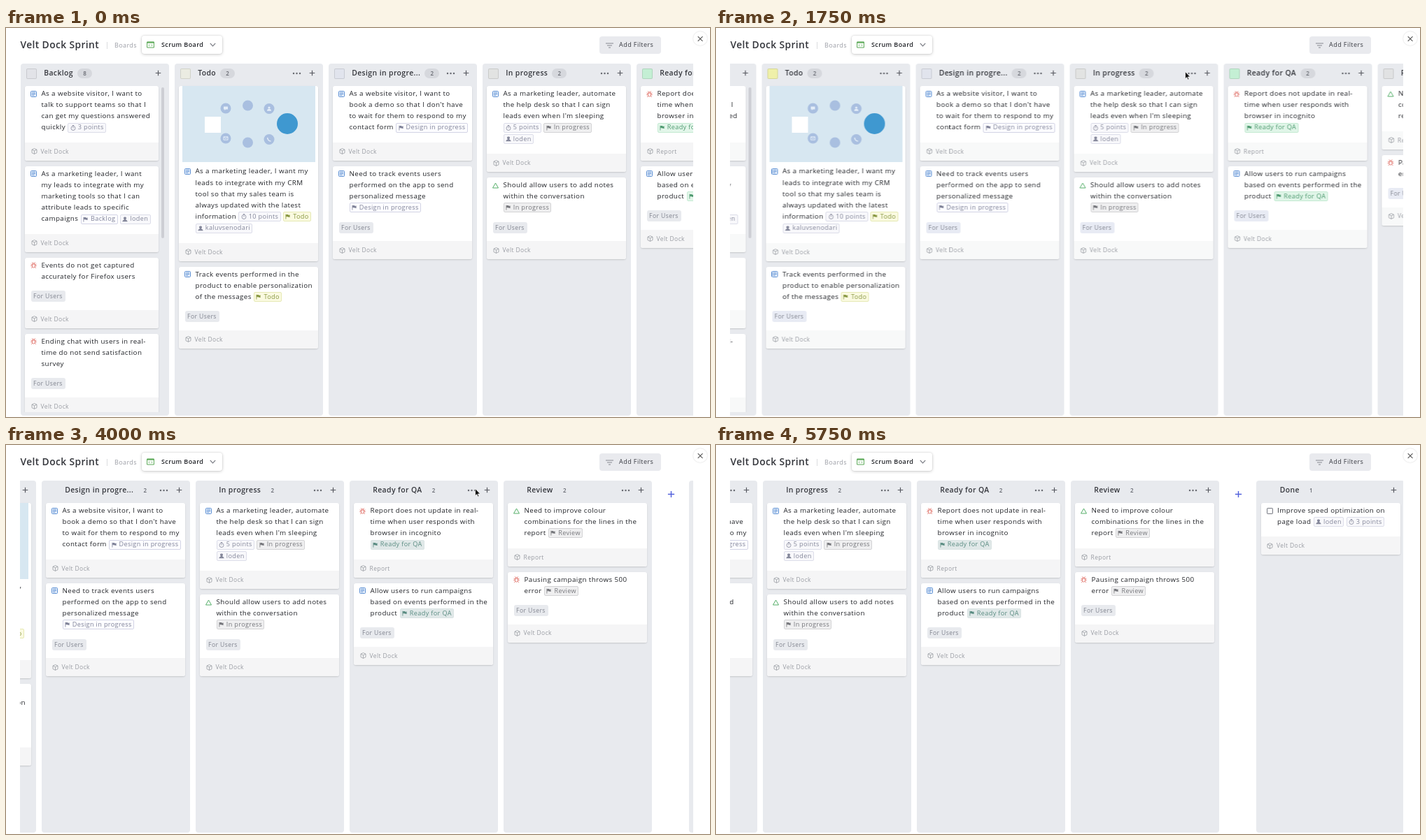
Animation of 1006 by 557 pixels, one loop 6.5 s. Source, as an HTML page:

```html
<!DOCTYPE html>
<html lang="en">
<head>
<meta charset="utf-8">
<title>Sprint board</title>
<style>
html, body { margin: 0; width: 100%; height: 100%; overflow: hidden; background: #fff; }
body { position: relative; font: 9.8px/16.2px "Open Sans", "Noto Sans", sans-serif; letter-spacing: .4px; color: #222429; white-space: nowrap; }
svg { display: block; flex: none; fill: none; stroke: currentColor; overflow: visible; }
.abs, .col, .swatch, .menu, .add, .thumb { position: absolute; }
.row { display: flex; align-items: center; }

/* top bar */
.title { left: 20.5px; top: 14px; font-size: 13.8px; line-height: 20px; font-weight: 600; color: #33353b; }
.rule { left: 144px; top: 20px; width: 1px; height: 10px; background: #dcdde0; }
.crumb { left: 155px; top: 17px; font-size: 9px; color: #9b9da5; }
.picker { left: 194px; top: 11px; width: 115px; height: 26px; border-radius: 4px; box-shadow: 0 0 1px 1px #0000000d, 0 1px 4px #00000030; }
.picker b { position: absolute; left: 28px; font-size: 9px; font-weight: 600; }
.filters { left: 848px; top: 12px; width: 88px; height: 25px; border-radius: 4px; background: #e9eaee; }
.filters span { position: absolute; left: 28px; font-size: 9.1px; color: #3c3e45; }
.close { left: 982px; top: 5px; width: 20px; height: 20px; border-radius: 50%; box-shadow: 0 0 2px #00000033; color: #555; }

/* board */
.view { left: 20px; top: 51px; width: 962px; height: 504px; overflow: hidden; }
.board { left: -20px; top: -51px; width: 1700px; height: 557px; animation: scroll 6.5s step-end infinite, tone 6.5s step-end infinite; }
.col { top: 51px; width: 212px; height: 504px; border-radius: 4px; background: #e8eaee; }
.head { position: absolute; left: 33.7px; top: 4.5px; height: 18px; font-size: 10.4px; font-weight: 600; color: #34363c; }
.badge { margin-left: 6px; width: 21px; height: 14px; border-radius: 7px; background: var(--badge); font: 600 8px/14px "Open Sans", sans-serif; letter-spacing: 0; text-align: center; color: #666971; }
.swatch { left: 8px; top: 6.5px; width: 15px; height: 15px; box-sizing: border-box; border: 1px solid #0000001c; border-radius: 2px; opacity: var(--swatch); }
.menu { left: 168.5px; top: 11.5px; color: #6a6c73; }
.add { left: 192px; top: 9px; color: #55575e; }
.thumb { left: 201px; top: 34px; width: 4.5px; height: 216px; border-radius: 3px; background: #cdced4; }
.cards { position: absolute; left: 0; top: 30px; width: 212px; height: 467px; padding-top: 2px; overflow: hidden; }
.card { margin: 0 6.5px 8px; border-radius: 3px; background: #fff; box-shadow: 0 1px 2px #00000026; overflow: hidden; }
.narrow .card { margin-right: 15px; }
.body { position: relative; padding: 2.9px 0 13.2px 23.5px; }
.labelled { padding-bottom: 11.5px; }
.body > svg { position: absolute; left: 8px; top: 6.5px; }
.line { display: flex; align-items: center; gap: 3.4px; height: 16.2px; }
.tag { display: flex; align-items: center; gap: 3px; height: 14px; box-sizing: border-box; padding: 0 2.3px; border: 1px solid; border-radius: 2px; font-size: 9.1px; letter-spacing: .36px; }
.label { width: 49px; height: 16px; margin: 12.2px 0 0 -15px; border-radius: 3px; background: var(--label); color: #80848f; font-size: 8.6px; line-height: 16px; text-align: center; }
.foot { display: flex; align-items: center; gap: 5px; height: 26px; padding-left: 8.5px; background: var(--foot); color: #999ca3; font-size: 8.5px; }
.pic { display: block; margin: 0 4.5px 2.6px; background: #d7e7f1; }
.plus { left: 1354.5px; top: 65px; color: #5260dc; }

.lilac { color: #7f8298; border-color: #d3d4e5; background: #fcfcff; }
.mist  { color: #84879a; border-color: #dcdde9; background: #f8f8fb; }
.grey  { color: #76777c; border-color: #d3d3d5; background: #efeff0; }
.lime  { color: #87963f; border-color: #e6e9b4; background: #fafae1; }
.green { color: var(--qa); border-color: var(--qa-edge); background: var(--qa-bg); }

.cursor { left: 670px; top: 61.5px; animation: pointer 6.5s step-end infinite; }

@keyframes scroll {
  0% { transform: none; }
  3.846% { transform: translateX(-8px); }
  7.692% { transform: translateX(-32px); }
  11.538% { transform: translateX(-65.5px); }
  15.384% { transform: translateX(-98px); }
  19.23% { transform: translateX(-128px); }
  23.076% { transform: translateX(-154px); }
  26.923% { transform: translateX(-175.5px); }
  34.615% { transform: translateX(-212px); }
  38.461% { transform: translateX(-248px); }
  42.307% { transform: translateX(-284.5px); }
  46.153% { transform: translateX(-322px); }
  50% { transform: translateX(-361px); }
  53.846% { transform: translateX(-394px); }
  61.538% { transform: translateX(-410px); }
  65.384% { transform: translateX(-447px); }
  69.23% { transform: translateX(-485px); }
  73.076% { transform: translateX(-522.5px); }
  76.923% { transform: translateX(-553px); }
  80.769% { transform: translateX(-579px); }
  84.615% { transform: translateX(-600px); }
  88.461%, 100% { transform: translateX(-614px); }
}
@keyframes tone {
  0% { --swatch: 1; --badge: #d6d8dd; --label: #e8eaee; --foot: #f5f5f6; --todo: #ebece2; --qa: #4f9a70; --qa-edge: #c4ead2; --qa-bg: #e3f6ea; }
  3.846% { --swatch: 1; --badge: #d6d8dd; --label: #e8ebf4; --foot: #f8f9f9; --todo: #eff0a9; --qa: #4f9a70; --qa-edge: #c4ead2; --qa-bg: #e0f5e8; }
  61.538%, 100% { --swatch: 0; --badge: #e8eaee; --label: #e8eaee; --foot: #f5f5f6; --todo: #eff0a9; --qa: #5a8c82; --qa-edge: #dbe4e4; --qa-bg: #e0e8e8; }
}
@keyframes pointer {
  0% { opacity: 0; }
  3.846% { opacity: 1; }
  88.461%, 100% { opacity: 0; }
}
</style>
</head>
<body>
<svg width="0" height="0" style="position:absolute">
  <symbol id="story" viewBox="0 0 9 9"><rect x=".5" y=".5" width="8" height="8" rx="1" fill="#e9f1fc"/><path d="M2 2.7h5M2 4.5h5M2 6.3h3.4" stroke-width=".9"/></symbol>
  <symbol id="bug" viewBox="0 0 9 9"><path d="M2.6 3.2h3.8v2.7a1.9 2.2 0 0 1-3.8 0zM3 3.2a1.5 1.6 0 0 1 3 0M2.6 4.2.5 3M6.4 4.2 8.5 3M2.6 5.6H.2M6.4 5.6h2.4M3 7.2 1.1 8.8M6 7.2l1.9 1.6M3.3 1.9 2.3.4M5.700 1.9l1-1.5" stroke-width=".75"/></symbol>
  <symbol id="idea" viewBox="0 0 9 9"><path d="M4.5 1 8.5 8h-8z"/></symbol>
  <symbol id="task" viewBox="0 0 9 9"><rect x=".6" y=".6" width="7.8" height="7.8" rx=".5"/></symbol>
  <symbol id="flag" viewBox="0 0 8 8"><path d="M.9.8v6.8" stroke-width=".8"/><path d="M1.2 1h2.7l.5.7h2.7l-.8 1.5.8 1.6H4.300l-.4-.6H1.2z" fill="currentColor" stroke="none"/></symbol>
  <symbol id="clock" viewBox="0 0 8 8"><circle cx="4" cy="4.5" r="3" stroke-width=".8"/><path d="M4 4.5V2.8M2.8.5h2.4" stroke-width=".8"/></symbol>
  <symbol id="person" viewBox="0 0 8 8"><path d="M4 .4a1.9 1.9 0 0 1 1 3.6c0 .8 2.6.9 2.6 3.3H.4C.4 4.9 3 4.8 3 4A1.9 1.9 0 0 1 4 .4z" fill="currentColor" stroke="none"/></symbol>
  <symbol id="cube" viewBox="0 0 9 9"><path d="M4.5.6 8 2.2v4.5L4.5 8.4 1 6.7V2.2zM1 2.2l3.5 1.7L8 2.2M4.5 3.9v4.5" stroke-width=".8"/></symbol>
  <symbol id="cross" viewBox="0 0 10 10"><path d="M5 .8v8.4M.8 5h8.4" stroke-width="1.3"/></symbol>
</svg>

<div class="abs title">Velt Dock Sprint</div>
<div class="abs rule"></div>
<div class="abs crumb">Boards</div>
<div class="abs picker row">
  <svg class="abs" style="left:7px;color:#5aa856" width="11" height="10"><path d="M.6 1h9.8v8H.6z"/><path d="M.6 1.7h9.8" stroke-width="1.8"/><path d="M4.4 4.3 3 5.7l1.4 1.4M6.6 4.3 8 5.7 6.6 7.1" stroke-width=".8"/></svg>
  <b>Scrum Board</b>
  <svg class="abs" style="left:96.5px;color:#777a82" width="9" height="6"><path d="m.8.8 3.7 4L8.2.8" stroke-width="1.2"/></svg>
</div>
<div class="abs filters row">
  <svg class="abs" style="left:9px;color:#85878f" width="11" height="8"><path d="M0 1h11M2 4h7M4 7h3"/></svg>
  <span>Add Filters</span>
</div>
<div class="abs close"><svg width="20" height="20"><path d="m6.7 7.1 6.8 6.8M13.5 7.1l-6.8 6.8" stroke-width="1.1"/></svg></div>

<div class="abs view"><div class="abs board" id="board"></div></div>
<svg class="abs cursor" width="9" height="13"><path d="M.5.5v10.3l2.3-2.2 1.5 3.5 1.6-.7-1.5-3.4h3.2z" fill="#111" stroke="#fff" stroke-width=".7"/></svg>

<script>
const icon = (id, size, color = '') =>
  `<svg width="${size}" height="${size}" style="color:${color}"><use href="#${id}"/></svg>`;

const markColor = { story: '#5a8ed2', bug: '#dc6258', idea: '#54ae68', task: '#70737d' };

// tag kind: [style, icon, fixed text]
const kinds = {
  pts: ['mist', 'clock'], user: ['mist', 'person'],
  log: ['lilac', 'flag', 'Backlog'], design: ['lilac', 'flag', 'Design in progress'],
  todo: ['lime', 'flag', 'Todo'], prog: ['grey', 'flag', 'In progress'],
  qa: ['green', 'flag', 'Ready for QA'], review: ['grey', 'flag', 'Review']
};

function tag(spec) {
  const [kind, text] = spec.split(':');
  const [style, glyph, fixed] = kinds[kind];
  return `<span class="tag ${style}">${icon(glyph, 8)}${text || fixed}</span>`;
}

function line(src) {
  const [text, ...tags] = src.split('|');
  return `<div class="line">${text && `<span>${text}</span>`}${tags.map(tag).join('')}</div>`;
}

const dot = (x, y, glyph = '') =>
  `<g transform="translate(${x} ${y})"><circle r="7.5" fill="#a9bfe0" stroke="none"/><g stroke="#e4eef8" fill="#e4eef8">${glyph}</g></g>`;

const picture = `<svg class="pic" width="190" height="109">
  ${dot(62, 32, '<path d="M-3-2.5h6v4H0l-1.5 1.5V1.5H-3z" stroke="none"/>')}
  ${dot(93.5, 28)}
  ${dot(124, 32.5, '<circle cy="-1.5" r="1.6" stroke="none"/><path d="M-3 3.2a3 3 0 0 1 6 0z" stroke="none"/>')}
  ${dot(62, 75, '<path d="M-3-2.2h6v4.4h-6zM-3-2.2 0 .4l3-2.6" fill="none"/>')}
  ${dot(93.5, 81)}
  ${dot(124, 76.5, '<path d="M-2.3-2.6c0 2.8 2 4.9 4.8 5" fill="none" stroke-width="1.5"/>')}
  <rect x="32" y="44" width="23" height="23" fill="#fff" stroke="none"/>
  <circle cx="150" cy="54" r="15" fill="#3f98d0" stroke="none"/>
</svg>`;

const dots = `<svg class="menu" width="13" height="4"><g fill="currentColor" stroke="none">
  ${[2, 6.5, 11].map(x => `<circle cx="${x}" cy="2" r="1.25"/>`).join('')}</g></svg>`;

function card({ mark, text, users, foot = 'Velt Dock', pic }) {
  return `<div class="card">${pic ? picture : ''}
    <div class="body ${users ? 'labelled' : ''}">${icon(mark, 9, markColor[mark])}${text.map(line).join('')}
    ${users ? '<div class="label">For Users</div>' : ''}</div>
    <div class="foot">${icon('cube', 9)}${foot}</div></div>`;
}

function column({ x, name, count, color, cards, narrow, menu = true }) {
  return `<div class="col ${narrow ? 'narrow' : ''}" style="left:${x}px">
    ${color ? `<div class="swatch" style="background:${color}"></div>` : ''}
    <div class="head row">${name}<span class="badge">${count}</span></div>
    ${menu ? dots : ''}
    <div class="add">${icon('cross', 9)}</div>
    <div class="cards">${cards.map(card).join('')}</div>
    ${narrow ? '<div class="thumb"></div>' : ''}</div>`;
}

const columns = [
  { x: 20.5, name: 'Backlog', count: 8, color: '#e2e3e8', narrow: true, menu: false, cards: [
    { mark: 'story', text: ['As a website visitor, I want to', 'talk to support teams so that I', 'can get my questions answered', 'quickly|pts:3 points'] },
    { mark: 'story', text: ['As a marketing leader, I want', 'my leads to integrate with my', 'marketing tools so that I can', 'attribute leads to specific', 'campaigns|log|user:loden'] },
    { mark: 'bug', users: true, text: ['Events do not get captured', 'accurately for Firefox users'] },
    { mark: 'bug', users: true, text: ['Ending chat with users in real-', 'time do not send satisfaction', 'survey'] }
  ] },
  { x: 240.5, name: 'Todo', count: 2, color: 'var(--todo)', cards: [
    { mark: 'story', pic: true, text: ['As a marketing leader, I want my', 'leads to integrate with my CRM', 'tool so that my sales team is', 'always updated with the latest', 'information|pts:10 points|todo', '|user:kaluvsenodari'] },
    { mark: 'story', users: true, text: ['Track events performed in the', 'product to enable personalization', 'of the messages|todo'] }
  ] },
  { x: 460.5, name: 'Design in progre...', count: 2, color: '#e1e4ed', cards: [
    { mark: 'story', text: ['As a website visitor, I want to', "book a demo so that I don't have", 'to wait for them to respond to my', 'contact form|design'] },
    { mark: 'story', users: true, text: ['Need to track events users', 'performed on the app to send', 'personalized message', '|design'] }
  ] },
  { x: 680.5, name: 'In progress', count: 2, color: '#e2e3e2', cards: [
    { mark: 'story', text: ['As a marketing leader, automate', 'the help desk so that I can sign', "leads even when I'm sleeping", '|pts:5 points|prog', '|user:loden'] },
    { mark: 'idea', users: true, text: ['Should allow users to add notes', 'within the conversation', '|prog'] }
  ] },
  { x: 900.5, name: 'Ready for QA', count: 2, color: '#c4efd4', cards: [
    { mark: 'bug', foot: 'Report', text: ['Report does not update in real-', 'time when user responds with', 'browser in incognito', '|qa'] },
    { mark: 'story', users: true, text: ['Allow users to run campaigns', 'based on events performed in the', 'product|qa'] }
  ] },
  { x: 1120.5, name: 'Review', count: 2, color: '#e1e2e3', cards: [
    { mark: 'idea', foot: 'Report', text: ['Need to improve colour', 'combinations for the lines in the', 'report|review'] },
    { mark: 'bug', users: true, text: ['Pausing campaign throws 500', 'error|review'] }
  ] },
  { x: 1386, name: 'Done', count: 1, menu: false, cards: [
    { mark: 'task', text: ['Improve speed optimization on', 'page load|user:loden|pts:3 points'] }
  ] }
];

document.getElementById('board').innerHTML =
  columns.map(column).join('') + `<div class="abs plus">${icon('cross', 11)}</div>`;
</script>
</body>
</html>
```
